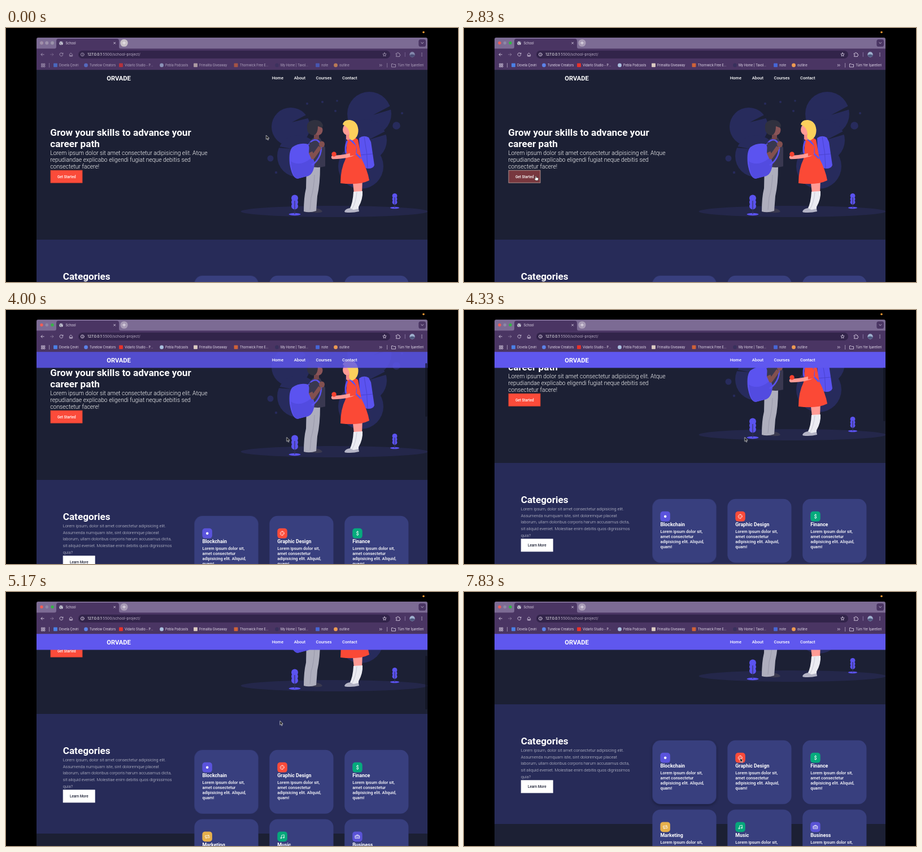
Animation of 800x450 px, one loop 8 s. Source, as an HTML page:

```html
<!DOCTYPE html>
<html lang="en">
<head>
<meta charset="utf-8">
<title>School</title>
<style>
  html, body { margin: 0; width: 100%; height: 100%; overflow: hidden; background: #000; }
  svg { display: block; width: 100vw; height: 100vh; }
  text { font-family: Roboto, sans-serif; fill: #fff; white-space: pre; }
  .ui text { font-family: Inter, sans-serif; font-size: 5.55px; fill: #e4dcec; }
  .ui .url { font-size: 6.6px; fill: #b9aec6; }
  .line { fill: none; stroke: #d5cbe0; stroke-width: .9; stroke-linecap: round; stroke-linejoin: round; }
  .h1 { font-size: 17.15px; font-weight: 700; }
  .lead { font-size: 10.3px; font-weight: 300; }
  .body { font-size: 7.47px; font-weight: 300; fill: #d3d4de; }
  .btn { font-size: 6.4px; font-weight: 500; }
  .nav { font-size: 7.55px; font-weight: 500; }
  .h2 { font-size: 8.8px; font-weight: 700; }
  .copy { font-size: 7.47px; font-weight: 500; }
  .glyph { fill: none; stroke: #fff; stroke-width: .8; stroke-linejoin: round; stroke-linecap: round; }

  .anim { animation: 8s step-end -6ms infinite; }
  #page { animation-name: scroll; }
  #thumb { animation-name: thumb; }
  #bar { animation-name: bar; }
  #pointer { animation-name: move; }
  #hand { animation-name: hand; }
  #arrow { animation-name: arrow; }
  .dim { animation-name: dim; }
  .grey { animation-name: grey; }
  #start { animation-name: start; }
  #learn { animation-name: learn; }
  #learnText { animation-name: learnText; }
  #card0 { animation-name: lift; }

  @keyframes scroll {
    0% { transform: translateY(0); }
    45.83% { transform: translateY(-1px); }
    47.91% { transform: translateY(-32px); }
    50% { transform: translateY(-74px); }
    52.08% { transform: translateY(-97px); }
    54.16% { transform: translateY(-104px); }
    58.33% { transform: translateY(-112px); }
    60.41% { transform: translateY(-128px); }
    62.5% { transform: translateY(-146px); }
    64.58% { transform: translateY(-159px); }
    66.66% { transform: translateY(-168px); }
    68.75% { transform: translateY(-173px); }
    70.83%, 100% { transform: translateY(-176px); }
  }
  @keyframes thumb {
    0% { opacity: 0; transform: translateY(0); }
    45.83% { opacity: 1; transform: translateY(0); }
    47.91% { opacity: 1; transform: translateY(8px); }
    50% { opacity: 1; transform: translateY(19px); }
    52.08% { opacity: 1; transform: translateY(25px); }
    54.16% { opacity: 1; transform: translateY(27px); }
    58.33% { opacity: 1; transform: translateY(29px); }
    60.41% { opacity: 1; transform: translateY(33px); }
    62.5% { opacity: 1; transform: translateY(38px); }
    66.66% { opacity: 1; transform: translateY(44px); }
    70.83% { opacity: 1; transform: translateY(46px); }
    72.91%, 100% { opacity: 0; transform: translateY(46px); }
  }
  @keyframes bar {
    0% { opacity: 0; }
    47.91% { opacity: .4; }
    50% { opacity: .83; }
    52.08%, 100% { opacity: 1; }
  }
  @keyframes move {
    0% { transform: translate(460.5px, 190px); }
    27.08% { transform: translate(445px, 195px); }
    29.16% { transform: translate(380px, 212px); }
    31.25% { transform: translate(260px, 240px); }
    33.33% { transform: translate(138px, 261px); }
    35.41% { transform: translate(127.2px, 262px); }
    41.66% { transform: translate(210px, 255px); }
    43.75% { transform: translate(420px, 235px); }
    45.83% { transform: translate(496.8px, 225.5px); }
    58.33% { transform: translate(490px, 227px); }
    60.41% { transform: translate(485px, 228.3px); }
    72.91% { transform: translate(390px, 270px); }
    75% { transform: translate(150px, 346px); }
    77.08% { transform: translate(145.6px, 346.5px); }
    79.16% { transform: translate(190px, 342px); }
    81.25% { transform: translate(345px, 322px); }
    83.33% { transform: translate(378px, 314px); }
    85.41% { transform: translate(385px, 312px); }
    91.66% { transform: translate(400px, 308px); }
    93.75% { transform: translate(425px, 304px); }
    95.83% { transform: translate(455px, 300px); }
    97.91%, 100% { transform: translate(488.8px, 294px); }
  }
  @keyframes hand {
    0%, 41.66%, 79.16%, 100% { opacity: 0; }
    33.33%, 75% { opacity: 1; }
  }
  @keyframes arrow {
    0%, 41.66%, 79.16%, 100% { opacity: 1; }
    33.33%, 75% { opacity: 0; }
  }
  @keyframes dim { 0% { opacity: .68; } 4.16%, 100% { opacity: 1; } }
  @keyframes grey { 0% { opacity: 1; } 4.16%, 100% { opacity: 0; } }
  @keyframes start {
    0% { fill: #fb4b3a; stroke: #d9432f; }
    35.41% { fill: #78373e; stroke: #b99a96; }
    37.5% { fill: #1c2034; stroke: #fff; }
    41.66% { fill: #2e2335; stroke: #f4dcd8; }
    43.75% { fill: #c04139; stroke: #dd6a5a; }
    45.83%, 100% { fill: #fb4b3a; stroke: #d9432f; }
  }
  @keyframes learn {
    0% { fill: #fff; }
    75% { fill: #e8e8ee; }
    77.08% { fill: #50537d; }
    79.16% { fill: #2b2f5b; }
    81.25% { fill: #c0c1ce; }
    83.33%, 100% { fill: #fff; }
  }
  @keyframes learnText {
    0% { fill: #1c2034; }
    77.08% { fill: #c2bdbd; }
    79.16% { fill: #fff; }
    81.25% { fill: #555869; }
    83.33%, 100% { fill: #1c2034; }
  }
  @keyframes lift {
    0% { filter: none; }
    81.25% { filter: drop-shadow(0 2px 2px rgba(0, 0, 0, .1)); }
    83.33% { filter: drop-shadow(0 8px 6px rgba(0, 0, 0, .22)); }
    85.41% { filter: drop-shadow(0 12px 8px rgba(0, 0, 0, .3)); }
    97.91%, 100% { filter: drop-shadow(0 2px 2.5px rgba(0, 0, 0, .32)); }
  }
</style>
</head>
<body>
<svg viewBox="0 0 800 450" preserveAspectRatio="none">
  <defs><clipPath id="view"><rect x="54" y="74" width="692" height="376"/></clipPath></defs>
  <rect width="800" height="450"/>
  <circle cx="739" cy="7.5" r="1.8" fill="#ee9834"/>

  <g clip-path="url(#view)">
    <rect x="54" y="74" width="692" height="376" fill="#1c2034"/>
    <g id="page" class="anim">
      <rect x="54" y="375" width="692" height="212" fill="#272b58"/>

      <!-- backdrop -->
      <ellipse cx="581" cy="325" rx="165.5" ry="10" fill="#24274a"/>
      <g fill="#272b5c">
        <circle cx="504" cy="175" r="34"/><circle cx="517" cy="227" r="37"/>
        <circle cx="643" cy="152" r="39"/><circle cx="637" cy="199" r="37"/><circle cx="628" cy="245" r="40"/>
        <circle cx="691" cy="173" r="6.8"/><circle cx="468" cy="231" r="5.5"/>
        <circle cx="533" cy="134" r="2"/><circle cx="560" cy="131" r="2"/><circle cx="586" cy="129" r="1.8"/>
        <circle cx="583" cy="147" r="2"/><circle cx="701" cy="151" r="2"/><circle cx="478" cy="256" r="2.2"/>
      </g>
      <path d="M537 151 506 167 538 159ZM479 209 506 214 480 212ZM684 136 650 154 683 144ZM675 181 642 198 675 188Z" fill="#1c2034"/>

      <!-- boy -->
      <path d="M527 321 L546 319 Q557 320 560 325 Q558 328 545 327 L528 326Z" fill="#3b3a50"/>
      <path d="M532 242 L556 245 Q556 276 551 298 L549 324 Q537 328 527 325 Q527 300 531 284Z" fill="#aeaebd"/>
      <path d="M546 260 Q545 285 540 300 L538 322" fill="none" stroke="#9a9aac" stroke-width="1"/>
      <path d="M540 198 Q548 190 556 195 L565 212 V245 Q552 249 538 245 L533 220Z" fill="#393850"/>
      <path d="M507 211 Q520 202 535 206 L546 238 Q545 261 531 263 L516 267 Q506 266 502 240 Q500 218 507 211Z" fill="#5b53f0"/>
      <path d="M504 236 Q520 247 541 230 L546 238 Q545 261 531 263 L516 267 Q507 266 504 236Z" fill="#524be0"/>
      <path d="M536 207 Q540 198 549 198 Q562 204 556 224 Q551 237 541 243" fill="none" stroke="#5b53f0" stroke-width="2.6"/>
      <path d="M537 203 Q546 200 551 209 L547 224 536 222Z" fill="#393850"/>
      <path d="M539 220 543 229 556 211" fill="none" stroke="#83504f" stroke-width="7" stroke-linejoin="round"/>
      <ellipse cx="559" cy="206" rx="5" ry="5.5" fill="#83504f"/>
      <path d="M545 183h9v13q-5 3-9 0Z" fill="#74464b"/>
      <ellipse cx="552.5" cy="181" rx="8" ry="9" fill="#8a5457"/>
      <path d="M533 178 Q531 165 545 163 Q558 162 561 172 L560 177 552 174 Q552 184 548 188 Q544 192 538 188 Q533 185 533 178Z" fill="#30313f"/>

      <!-- girl -->
      <path d="M625 195 Q633 189 642 194 L646 202 652 243 Q650 249 641 249 L627 247Z" fill="#5b53f0"/>
      <path d="M634 193 Q640 222 640 249M627 225 649 223" fill="none" stroke="#4a43cf" stroke-width="1"/>
      <path d="M613 266H631L630 293H616Z" fill="#ff9b95"/>
      <path d="M615 290 631 289 Q632 303 624 317 L624 324 H611 L608 321 Q614 310 615 290Z" fill="#ececf2"/>
      <path d="M621 291 Q619 309 613 320" fill="none" stroke="#c9c9d6" stroke-width="1"/>
      <path d="M599 325 Q601 320 609 319 L615 322 624 320 625 325 Q613 328 600 326.5Z" fill="#b4b4c6"/>
      <path d="M604 197 Q616 191 623 198 L629 231 Q640 252 643 270 Q625 279 592 275 Q592 250 601 232Z" fill="#fb4936"/>
      <path d="M608 197 Q622 206 619 222 L628 231M604 200 Q599 212 602 222" fill="none" stroke="#5b53f0" stroke-width="2.8"/>
      <path d="M616 222 Q607 228 579 229" fill="none" stroke="#ff9b95" stroke-width="6.5" stroke-linecap="round"/>
      <path d="M608 205 Q616 202 620 211 L619 225 609 227Z" fill="#fb4936"/>
      <circle cx="580.5" cy="223.5" r="4.2" fill="#f5412f"/>
      <path d="M602 184h9v12q-5 4-9 1Z" fill="#f58a86"/>
      <ellipse cx="603.5" cy="180" rx="7.5" ry="9.5" fill="#ff9b95"/>
      <path d="M596 171 Q598 162 609 163 Q622 165 623.5 180 Q624 194 613 199 Q605 197 608 187 Q607 176 596 171Z" fill="#fbd05c"/>

      <!-- plants -->
      <g fill="#5b53f0">
        <ellipse cx="511" cy="330" rx="10.5" ry="2.2"/>
        <circle cx="511" cy="301.5" r="6"/><circle cx="511" cy="308.5" r="6"/><circle cx="511" cy="315.5" r="6"/>
        <ellipse cx="688" cy="318.5" rx="8" ry="1.8"/>
        <circle cx="688" cy="297.3" r="4.4"/><circle cx="688" cy="303" r="4.4"/><circle cx="688" cy="308.5" r="4.4"/>
      </g>
      <path d="M511 306V330M688 300V318.5" stroke="#34325a" stroke-width="1.1"/>

      <text class="h1" x="78.3" y="191">Grow your skills to advance your<tspan x="78.3" dy="20.1">career path</tspan></text>
      <text class="lead" x="78.3" y="225">Lorem ipsum dolor sit amet consectetur adipisicing elit. Atque<tspan x="78.3" dy="12.1">repudiandae explicabo eligendi fugiat neque debitis sed</tspan><tspan x="78.3" dy="12.1">consectetur facere!</tspan></text>
      <rect id="start" class="anim" x="79" y="252.2" width="56" height="22" stroke-width=".9"/>
      <text class="btn" x="91" y="265.5">Get Started</text>

      <text class="h1" x="100.7" y="446">Categories</text>
      <text class="body" x="100.7" y="458.7">Lorem ipsum, dolor sit amet consectetur adipisicing elit.<tspan x="100.7" dy="11.85">Assumenda numquam iste, sint doloremque placeat</tspan><tspan x="100.7" dy="11.85">laborum, ullam doloribus corporis harum accusamus dicta,</tspan><tspan x="100.7" dy="11.85">sit aliquid eveniet. Molestiae enim debitis quos dignissimos</tspan><tspan x="100.7" dy="11.85">quia?</tspan></text>
      <rect id="learn" class="anim" x="101.2" y="509.8" width="56" height="22" stroke="#fff" stroke-width=".9"/>
      <text id="learnText" class="btn anim" x="113" y="523">Learn More</text>
      <g id="cards"></g>
    </g>

    <rect id="bar" class="anim" x="54" y="74" width="692" height="28.5" fill="#5f57ee"/>
    <text x="178.3" y="92.6" font-size="11.15" font-weight="700">ORVADE</text>
    <g class="nav">
      <text class="nav" x="470.7" y="91.2">Home</text><text class="nav" x="509.7" y="91.2">About</text>
      <text class="nav" x="548.5" y="91.2">Courses</text><text class="nav" x="595" y="91.2">Contact</text>
    </g>
    <rect id="thumb" class="anim" x="742.2" y="75" width="3.2" height="95" rx="1.6" fill="#10131f" fill-opacity=".75"/>
  </g>

  <!-- browser window -->
  <g class="ui">
    <path d="M54 37V20q0-3 3-3H743q3 0 3 3V37Z" fill="#7c6b94"/>
    <rect x="54" y="36.5" width="692" height="37.7" fill="#4a3563"/>
    <path d="M85 37q4 0 4-4V23q0-4 4-4H196q4 0 4 4V33q0 4 4 4Z" fill="#4a3563"/>
    <circle cx="63" cy="26.5" r="2.7" fill="#f25d57"/><circle cx="72.3" cy="26.5" r="2.7" fill="#8d87a6"/><circle cx="82" cy="26.5" r="2.7" fill="#35b548"/>
    <g class="grey anim" fill="#9d90ac">
      <circle cx="63" cy="26.5" r="2.9"/><circle cx="72.3" cy="26.5" r="2.9"/><circle cx="82" cy="26.5" r="2.9"/>
    </g>
    <circle cx="97.6" cy="27" r="3.3" fill="#cfd0dc"/>
    <path d="M95 25.5q3 1 2 2.5t2 2M99 24.2q-1 2 1.6 2.2" fill="none" stroke="#5f5675" stroke-width=".9"/>
    <text x="105.5" y="29">School</text>
    <path class="line" d="M190.7 25.2l3 3m0-3l-3 3"/>
    <circle cx="209" cy="26.5" r="6.6" fill="#a89bb6"/>
    <circle class="grey anim" cx="209" cy="26.5" r="6.6" fill="#c8c1c8"/>
    <path class="line" d="M206.6 26.5h4.8m-2.4-2.4v4.8" style="stroke:#f4f0f6"/>
    <rect x="730.3" y="20.2" width="12.8" height="12.8" rx="3.6" fill="#4a3563"/>
    <path class="line" d="M734.9 25.7l1.9 1.9 1.9-1.9"/>

    <rect x="128" y="40" width="552" height="14" rx="7" fill="#32244a"/>
    <text class="url" x="144.3" y="49.4"><tspan fill="#fff">127.0.0.1</tspan>:5500/school-project/</text>
    <g class="dim anim">
      <path class="line" d="M67.2 47H62m2.2-2.3L61.9 47l2.3 2.3M100.3 45.2a2.9 2.9 0 1 0 .4 2.6m.2-3.6v1.8h-1.9M112.4 47v2.9h5.2V47l-2.6-2.5Zm1.9 2.9v-1.6h1.4v1.6"/>
      <path class="line" d="M78.6 47h5.2m-2.2-2.3 2.3 2.3-2.3 2.3" opacity=".45"/>
      <circle class="line" cx="135.3" cy="47" r="2.9"/><path class="line" d="M135.3 46.8v1.6m0-3v.1"/>
      <path class="line" d="M670 43.8l.9 2.1 2.3.2-1.7 1.6.5 2.2-2-1.1-2 1.1.5-2.2-1.7-1.6 2.3-.2ZM690.6 45h1.8q.1-1.6 1.2-1.6t1.2 1.6h1.7v1.7q1.5.1 1.5 1.2t-1.5 1.2v1.5h-5.9v-1.8q1.3-.1 1.3-1t-1.3-1Z"/>
      <path d="M706.3 43v8" stroke="#8572a0" stroke-width="1"/>
      <circle cx="719" cy="47" r="4.7" fill="#9fb0ce"/><path d="M714.5 48q4.5-3 9 0a4.7 4.7 0 0 1-9 0Z" fill="#4f5a80"/>
      <g fill="#d5cbe0"><circle cx="736" cy="44.4" r=".75"/><circle cx="736" cy="47" r=".75"/><circle cx="736" cy="49.6" r=".75"/></g>
      <path class="line" d="M63 63.2h2.2v2.2H63Zm3.6 0h2.2v2.2h-2.2ZM63 66.8h2.2V69H63Zm3.6 0h2.2V69h-2.2Z"/>
      <path d="M76.6 62v8M674.6 62v8" stroke="#a797b8" stroke-width=".9"/>
      <path class="line" d="M661.2 64.3l1.6 1.7-1.6 1.7m2.6-3.4 1.6 1.7-1.6 1.7M682.8 63.6h2.4l.9 1h3.4v4.5h-6.7Z"/>
      <text x="693.3" y="68">Tüm Yer İşaretleri</text>
      <g id="marks"></g>
    </g>
  </g>

  <g id="pointer" class="anim">
    <path id="arrow" class="anim" d="M0 0V7.3L1.7 5.8 2.9 8.5 4.1 8 2.9 5.3H5.2Z" fill="#0a0a0a" stroke="#fff" stroke-width=".7"/>
    <path id="hand" class="anim" d="M-.9.8Q0-.7.9.8V3q3-.3 3.6 1.2.3 2-1 4H-.5Q-2 6.3-2.8 4.8-2.3 3.6-.9 4.7Z" fill="#fff" stroke="#111" stroke-width=".6"/>
  </g>
</svg>

<script>
  const fill = (id, html) => { document.getElementById(id).innerHTML = html; };

  // icon x, colour, round or square, label x, label
  const marks = [
    [87.5, "#4b80e6", 0, 94, "Dovela Çeviri"],
    [141.5, "#5c82e8", 1, 148, "Tunelow Creators"],
    [203.5, "#e8322b", 0, 210, "Vidarlo Studio - P..."],
    [275.5, "#a9bfdf", 1, 282, "Pebla Podcasts"],
    [335.5, "#dccbc2", 0, 342, "Frimalita Giveaway"],
    [407, "#cf6238", 0, 414, "Thornwick Free E..."],
    [479.5, "#38305c", 1, 486, "My Home | Tavol..."],
    [551.5, "#4666d6", 0, 558.3, "note"],
    [583.5, "#ee9a52", 1, 590, "outline"]
  ];
  fill("marks", marks.map(([x, color, round, tx, label]) =>
    `<rect x="${x - 3.4}" y="62.5" width="6.8" height="6.8" rx="${round ? 3.4 : .8}" fill="${color}"/>
     <text x="${tx}" y="68">${label}</text>`).join(""));

  const glyphs = {
    dot: '<circle r="2.2" fill="#fff"/>',
    palette: '<path class="glyph" d="M0-3.6A3.6 3.6 0 1 0 1 3.4Q-.2 1.2 1.6 1.1H3.2Q3.8-3.3 0-3.6ZM-1.8-.8v.1M0-1.9v.1M1.7-.9v.1M-1.7 1.1v.1"/>',
    dollar: '<text y="3" font-size="8.2" font-weight="500" text-anchor="middle">$</text>',
    arrows: '<path class="glyph" d="M-3.7.3V-1.7H3m-1.4-1.5L3.2-1.7 1.6-.3M3.7-.3V1.9H-3m1.4-1.5L-3.2 1.9-1.6 3.3"/>',
    notes: '<path class="glyph" d="M-1.4 2.3V-2.4L3.2-3.3V1.4"/><circle cx="-2.3" cy="2.4" r="1.1" class="glyph"/><circle cx="2.3" cy="1.5" r="1.1" class="glyph"/>',
    bag: '<path class="glyph" d="M-3.7-1.7H3.7V3H-3.7ZM-1.4-1.7V-3.1H1.4V-1.7M-3.7.4Q0 1.8 3.7.4"/>'
  };
  const cards = [
    ["Blockchain", "#5a53dc", "dot"], ["Graphic Design", "#fb4b3a", "palette"], ["Finance", "#06aa7d", "dollar"],
    ["Marketing", "#e6b04c", "arrows"], ["Music", "#06a77b", "notes"], ["Business", "#5a53d6", "bag"]
  ];
  const copy = ["Lorem ipsum dolor sit,", "amet consectetur", "adipisicing elit. Aliquid,", "quam!"];
  fill("cards", cards.map(([title, color, glyph], i) => {
    const x = 333.4 + i % 3 * 132.9, y = 438.8 + Math.floor(i / 3) * 122.6;
    const lines = copy.map((s, n) => `<text class="copy" x="14" y="${60.4 + n * 8.8}">${s}</text>`).join("");
    return `<g transform="translate(${x} ${y})">
      <rect id="card${i}" class="anim" width="113.2" height="113" rx="14.3" fill="#383f7e"/>
      <rect x="14" y="22" width="17.5" height="17.8" rx="5" fill="${color}"/>
      <g transform="translate(22.8 31)">${glyphs[glyph]}</g>
      <text class="h2" x="14" y="48.6">${title}</text>${lines}</g>`;
  }).join(""));
</script>
</body>
</html>
```
